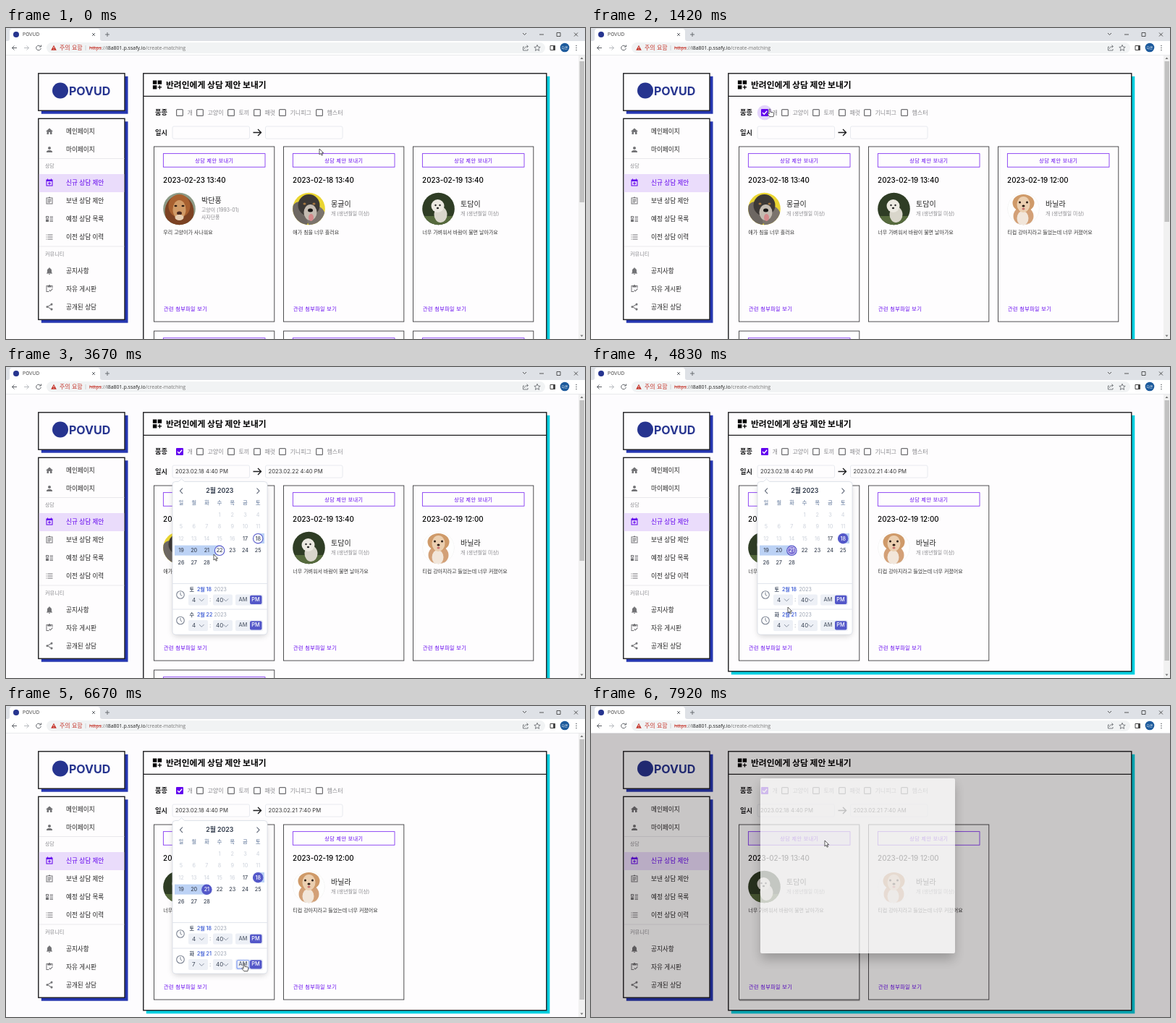
An HTML page that plays this animation: 800 by 430 pixels, repeating every 8 s.

```html
<!DOCTYPE html>
<html lang="ko">
<head>
<meta charset="utf-8">
<title>상담 제안</title>
<style>
html, body { margin: 0; width: 100%; height: 100%; overflow: hidden; background: #fdfcfe; }
svg { display: block; width: 800px; height: 430px; font-family: Inter, "Noto Sans CJK KR", "Noto Sans CJK", sans-serif; }
text { white-space: pre; }
</style>
</head>
<body>
<svg id="stage" viewBox="0 0 800 430">
  <defs>
    <clipPath id="disc"><circle r="22.3"/></clipPath>
    <filter id="soft" x="-20%" y="-20%" width="140%" height="140%"><feGaussianBlur stdDeviation="4"/></filter>
    <filter id="wide" x="-20%" y="-20%" width="140%" height="140%"><feGaussianBlur stdDeviation="8"/></filter>
  </defs>
  <g id="panel"/><g id="sidebar"/><g id="filters"/><g id="cards"/><g id="picker"/><g id="scrollbar"/>
  <g id="modal"/><g id="browser"/><g id="cursor"/>
</svg>
<script>
const LOOP = 8000;
const AT = { check: 1050, open: 2150, drag: 3420, drop: 4300, hour: 5500, am: 6700, close: 7150, modal: 7790 };
const PURPLE = '#6200ee', INDIGO = '#5458c9', INK = '#1c1c1e', GRAY = '#8a8a8e', PAPER = '#fefdfe';

// Drawing helpers
const text = (x, y, size, str, fill = INK, weight = 400, more = '') =>
  `<text x="${x}" y="${y}" font-size="${size}" fill="${fill}" font-weight="${weight}" ${more}>${str}</text>`;
const mid = 'text-anchor="middle"';
const rect = (x, y, w, h, fill, more = '') =>
  `<rect x="${x}" y="${y}" width="${w}" height="${h}" fill="${fill}" ${more}/>`;
const oval = (x, y, rx, ry, fill, more = '') =>
  `<ellipse cx="${x}" cy="${y}" rx="${rx}" ry="${ry}" fill="${fill}" ${more}/>`;
const line = (d, stroke, width = 1, more = '') =>
  `<path d="${d}" fill="none" stroke="${stroke}" stroke-width="${width}" ${more}/>`;
const icon = (x, y, scale, d, fill) =>
  `<path transform="translate(${x - 12 * scale} ${y - 12 * scale}) scale(${scale})" d="${d}" fill="${fill}" fill-rule="evenodd"/>`;
const ramp = (t, from, span) => Math.min(1, Math.max(0, (t - from) / span));

const shown = {};
function put(id, html) {
  if (shown[id] !== html) document.getElementById(id).innerHTML = shown[id] = html;
}

// Browser window
function browser() {
  const dark = '#5f6368';
  return rect(0, 0, 800, 18, '#dee1e6') + rect(0, 18, 800, 19.5, '#fff') +
    `<path d="M2 18q3 0 3-3V5q0-4 4-4H126q4 0 4 4V15q0 3 3 3z" fill="#fff"/>` +
    oval(14, 9, 4, 4, '#26348f') + text(23, 11.4, 6.6, 'POVUD', '#444') +
    line('M119 7l4 4m0-4l-4 4M137 9h6M140 6v6', dark, .9) +
    line('M714 7l2.5 2.5L719 7M737 9h6M761 6.5h5v5h-5zM785 6.5l5 5m0-5l-5 5', '#333', .8) +
    rect(56, 20, 689, 15, '#f1f3f4', 'rx="7.5"') +
    line('M15 27.5H8.5m3-3l-3 3 3 3', dark, 1) + line('M25 27.5h6.5m-3-3l3 3-3 3', '#b9bcc0', 1) +
    line('M47.5 25.3A3.3 3.3 0 1 0 48.3 28M48.5 23.5v2.5h-2.5', dark, 1) +
    `<path d="M66 23.8l3.8 7h-7.6z" fill="#c5352b"/>` + line('M66 26v2.3m0 .7v.8', '#fff', .8) +
    text(74, 30.4, 8, '주의 요함', '#c5352b') + line('M110 24v7', '#c9ccd0', .8) +
    `<text x="115" y="30" font-size="7" font-family="Open Sans, sans-serif" fill="#777"><tspan fill="#c5352b" text-decoration="line-through">https</tspan>://<tspan fill="#222">i8a801.p.ssafy.io</tspan>/create-matching</text>` +
    line('M716 26h-1.5v5h6.5v-2M716.5 29q0-3.5 4.5-3.5m-1.5-2l2 2-2 2', dark, .8) +
    line('M734 23.3l1.2 2.8 3 .3-2.3 2 .7 3-2.6-1.6-2.6 1.6.7-3-2.3-2 3-.3z', dark, .8) +
    line('M752 24.5h6.5v6h-6.5z', '#444', 1) + rect(756, 24.5, 2.5, 6, '#444') +
    oval(772, 27, 6.3, 6.3, '#1c5a9c') + text(772, 28.8, 4.9, '다온', '#fff', 400, mid) +
    [24.5, 27.5, 30.5].map(y => oval(788, y, .8, .8, dark)).join('') + rect(0, 37, 800, .6, '#dcdee2');
}

// Sidebar
const BOARD = 'M19 3h-4.2a3 3 0 0 0-5.6 0H3v18h18V3zM5 5h14v14H5z';
const MENU = [
  [143, '메인페이지', 'M10 20v-6h4v6h5v-8h3L12 3 2 12h3v8z'],
  [168, '마이페이지', 'M12 12a4 4 0 1 0 0-8 4 4 0 0 0 0 8zm0 2c-2.7 0-8 1.3-8 4v2h16v-2c0-2.7-5.3-4-8-4z'],
  [214, '신규 상담 제안', 'M19 3h-1V1h-2v2H8V1H6v2H3v18h18V3zM5 8h14v11H5zM11 9.5h2v3h3v2h-3v3h-2v-3H8v-2h3z'],
  [239, '보낸 상담 제안', BOARD + 'M7 8h10v2H7zM7 11.5h10v2H7zM7 15h7v2H7z'],
  [264, '예정 상담 목록', 'M2 4h8v7H2zM4 6h4v3H4zM2 13h8v7H2zM13 5h9v2h-9zM13 9h9v2h-9zM13 14h9v2h-9zM13 18h9v2h-9z'],
  [289, '이전 상담 이력', 'M3 5h2v2H3zM3 11h2v2H3zM3 17h2v2H3zM7 5h14v2H7zM7 11h14v2H7zM7 17h14v2H7z'],
  [336, '공지사항', 'M12 22a2 2 0 0 0 2-2h-4a2 2 0 0 0 2 2zm6-6v-5c0-3-1.6-5.6-4.5-6.3V4a1.5 1.5 0 0 0-3 0v.7C7.6 5.4 6 8 6 11v5l-2 2v1h16v-1z'],
  [360.5, '자유 게시판', 'M19 3h-4.2a3 3 0 0 0-5.6 0H3v18h8v-2H5V5h2v3h10V5h2v5h2V3zM20 11.5l1.5 1.5-7 7-4-4 1.5-1.5 2.5 2.5z'],
  [385.5, '공개된 상담', 'M18 2a3 3 0 0 0-3 3l.1.7L8 9.8a3 3 0 1 0 0 4.4l7.1 4.1a3 3 0 1 0 1-1.7L9 12.5v-1l7.1-4.1A3 3 0 1 0 18 2z'],
];
const framed = (x, y, w, h, shadow) => rect(x + 4, y + 4, w + .5, h + .5, shadow) +
  rect(x, y, w, h, PAPER, `stroke="${INK}" stroke-width="1.4"`);

function sidebar() {
  const blue = '#2536b0';
  return framed(44.8, 62.8, 119.2, 51.4, blue) + oval(75, 86.5, 11, 11, '#26348f') +
    text(87, 92.5, 16, 'POVUD', '#26348f', 700) +
    framed(44.8, 125.3, 119.2, 277.9, blue) + rect(45.8, 202, 117.5, 25, '#eadcfb') +
    line('M46 180.5h117.5M46 302h117.5', '#e4e4e8', .8) +
    text(54, 192.7, 6.9, '상담', GRAY) + text(54, 314.7, 7.2, '커뮤니티', GRAY) +
    MENU.map(([y, label, d]) => icon(60, y, .5, d, y == 214 ? PURPLE : '#737376') +
      text(83, y + 3.2, 8.6, label, y == 214 ? PURPLE : '#222')).join('');
}

// Main panel
function panel(short) {
  return framed(189.8, 62.8, 557, short ? 358 : 500, '#00cfe0') + line('M190 94.3h557', INK, 1.2) +
    icon(209, 78.5, .68, 'M3 3h8v8H3zM13 3h8v8h-8zM3 13h8v8H3zM16 13h2v3h3v2h-3v3h-2v-3h-3v-2h3z', '#000') +
    text(221, 82.8, 11.8, '반려인에게 상담 제안 보내기', '#000', 700);
}

const KINDS = [[240, '개'], [268, '고양이'], [311, '토끼'], [347, '패럿'], [382, '기니피그'], [433, '햄스터']];
function filters(checked, halo, from, to) {
  const boxes = KINDS.map(([x, label], i) => (checked && !i
    ? rect(x - 5, 112, 10, 10, PURPLE, 'rx="1"') + line('M237 117l2.2 2.2 4-4.4', '#fff', 1.4)
    : rect(x - 4.4, 112.6, 8.8, 8.8, 'none', 'rx="1" stroke="#6d6d70" stroke-width="1.2"')) +
    text(x + 10.5, 119.8, 8, label, GRAY)).join('');
  return text(206, 120.3, 9.2, '품종', INK, 700) + text(206, 147.8, 9.2, '일시', INK, 700) +
    oval(240, 117, 10.3, 10.3, '#dcc8fa', `opacity="${halo * .8}"`) + boxes +
    [230, 358.5].map(x => rect(x, 136, 106.5, 17, PAPER, 'rx="2" stroke="#e6e8ee" stroke-width=".9"')).join('') +
    line('M341.5 144.5h11m-4.5-4.5l4.5 4.5-4.5 4.5', INK, 1.4) +
    text(234, 147.3, 7.7, from, '#333') + text(362.5, 147.3, 7.7, to, '#333');
}

// Cards
const LION = {
  date: '2023-02-23 13:40', name: '박단풍', info: ['고양이 (1993-01)', '사자단풍'], note: '우리 고양이가 사나워요',
  photo: rect(-23, -23, 46, 46, '#8d9a86') + oval(0, 4, 20, 23, '#7c4223') + oval(0, -4, 15, 16, '#a8602f') +
    oval(0, 1, 9, 13, '#d09a66') + oval(-5, -4, 2, 1.3, '#2b1a12') + oval(5, -4, 2, 1.3, '#2b1a12') +
    oval(0, 6, 3.5, 2.5, '#4b2a20') + oval(0, 12, 6, 4, '#e6cdb0'),
};
const BLACK = {
  date: '2023-02-18 13:40', name: '몽글이', info: ['개 (생년월일 미상)'], note: '애가 침을 너무 흘러요',
  photo: rect(-23, -23, 46, 46, '#ead532') + oval(-13, 10, 13, 20, '#6d6762') + oval(10, 12, 13, 16, '#7b746d') +
    oval(0, -5, 15, 15, '#3d3936') + oval(2, 5, 9, 11, '#c4bbb1') + oval(2, 2, 3.5, 2.5, '#171514') +
    oval(3, 12, 3.5, 5, '#d58a8c') + oval(-6, -7, 2, 1.5, '#a57843') + oval(7, -7, 2, 1.5, '#a57843'),
};
const WHITE = {
  date: '2023-02-19 13:40', name: '토담이', info: ['개 (생년월일 미상)'], note: '너무 가벼워서 바람이 불면 날아가요',
  photo: rect(-23, -23, 46, 46, '#2f3d25') + rect(-23, 10, 46, 16, '#566a3d') + oval(3, 8, 9, 11, '#d9d6cb') +
    oval(-1, -4, 9, 9, '#ece9e1') + oval(-4, -5, 1.2, 1.2, '#222') + oval(2, -5, 1.2, 1.2, '#222') + oval(-1, -1, 1.6, 1.2, '#222'),
};
const TAN = {
  date: '2023-02-19 12:00', name: '바닐라', info: ['개 (생년월일 미상)'], note: '티컵 강아지라고 들었는데 너무 커졌어요',
  photo: rect(-23, -23, 46, 46, '#fefefe') + oval(0, 10, 14, 13, '#d3a077') + oval(-1, 13, 8, 10, '#f2e6da') +
    oval(0, -8, 15, 12, '#cf9a69') + oval(0, -6, 9, 11, '#ebcfb0') + oval(-5, -9, 1.5, 1.5, '#2a1c14') +
    oval(5, -9, 1.5, 1.5, '#2a1c14') + oval(0, -4, 2, 1.5, '#2a1c14') + oval(0, 0, 2, 1.5, '#c9706c') +
    '<circle r="22" fill="none" stroke="#eee" stroke-width=".7"/>',
};
const ALL = [LION, BLACK, WHITE, TAN, BLACK, WHITE], DOGS = [BLACK, WHITE, TAN, LION], IN_RANGE = [WHITE, TAN];

function card(pet, i, hover) {
  const x = 204.5 + i % 3 * 179, y = 164 + Math.floor(i / 3) * 255, extra = pet.info.length > 1;
  const lit = hover && !i;
  return `<g transform="translate(${x} ${y})">` +
    (lit ? rect(.5, 2, 166.5, 242, '#000', 'opacity=".25"') : '') +
    rect(0, 0, 166.3, 242, PAPER, 'stroke="#3c3c3e" stroke-width=".9"') +
    rect(12.8, 9.7, 140.7, 18.5, lit ? '#f1e8fd' : PAPER, `stroke="${PURPLE}" stroke-width=".7"`) +
    text(83.4, 21.6, 7, '상담 제안 보내기', PURPLE, 500, mid + ' letter-spacing=".5"') +
    text(12.6, 49.9, 9.8, pet.date, '#000', 500) +
    `<g transform="translate(35 86)" clip-path="url(#disc)">${pet.photo}</g>` +
    text(65.5, extra ? 78 : 83, 10, pet.name, '#222') +
    pet.info.map((s, n) => text(65.5, (extra ? 90 : 95) + n * 10.3, 6.9, s, GRAY)).join('') +
    text(12.8, 120.7, 7, pet.note, '#333') +
    text(13.5, 226.6, 7, '관련 첨부파일 보기', PURPLE, 500, 'letter-spacing=".5"') + '</g>';
}

// Date picker
const WEEK = [...'일월화수목금토'];
const cell = day => [242 + (day + 2) % 7 * 17.7, 204 + Math.floor((day + 2) / 7) * 16.6];

function timeRow(y, day, hour, am, focus) {
  const chosen = day > 16;
  const label = (x, str, on) => text(x, y + 24.2, 7.3, str, on ? '#fff' : '#5b6474', 500, mid);
  return line(`M230 ${y}h131`, '#dfe3ea', .9) + `<g opacity="${chosen ? 1 : .5}">` +
    `<circle cx="241" cy="${y + 15.5}" r="5.3" fill="none" stroke="#7d8594" stroke-width="1.1"/>` +
    line(`M241 ${y + 12}v3.5l2.3 1.5`, '#7d8594', 1) +
    text(253.5, y + 10.2, 7, WEEK[(day + 2) % 7], '#4a5568', 600) +
    text(264, y + 10.2, 7, `2월 ${day}`, '#4260d6', 600) + text(287.5, y + 10.2, 7, '2023', '#98a1b0') +
    rect(252, y + 15, 27, 15, '#edf0f6', 'rx="2"') + rect(286, y + 15, 27, 15, '#edf0f6', 'rx="2"') +
    rect(317, y + 15, 38, 15, '#edf0f6', 'rx="2"') +
    (chosen ? text(257, y + 25, 8, hour, '#3c4658') + text(290, y + 25, 8, '40', '#3c4658') : '') +
    line(`M267 ${y + 21}l3.3 3.3 3.3-3.3M300.5 ${y + 21}l3.3 3.3 3.3-3.3`, '#8b94a4', 1) +
    text(281, y + 24.5, 8, ':', '#8b94a4') +
    rect(am ? 319 : 337, y + 16.3, 16.5, 12.2, INDIGO, 'rx="2"') + label(327.5, 'AM', am) + label(345, 'PM', !am) +
    (focus ? rect(319, y + 16.5, 17, 11.7, 'none', 'rx="2" stroke="#7f9cf5" stroke-width="1.2"') : '') + '</g>';
}

function picker({ start, end, dragging, hover, ring, hour, am, focus }) {
  let bands = '', dots = '', days = '';
  if (start) {
    bands = rect(348, 230, 9, 14, '#bcd2f5');
    if (end > 18) bands += rect(233, 246.6, cell(end)[0] - 233, 14, '#bcd2f5');
  }
  if (hover) dots += oval(...cell(hover), 7, 7, '#e8ebf0');
  for (const day of start ? new Set([start, end]) : [])
    dots += oval(...cell(day), 6.7, 6.7, dragging ? '#fff' : INDIGO, `stroke="${INDIGO}" stroke-width="1.1"`);
  if (ring) dots += oval(...cell(end), 5.6, 5.6, '#7a70d4', `stroke="#e6d8f6" stroke-width="1" opacity="${ring}"`);
  for (let day = 1; day <= 28; day++) {
    const [x, y] = cell(day), solid = start && !dragging && (day == start || day == end);
    days += text(x, y + 2.6, 7.2, day, solid ? '#fff' : day < 17 ? '#d3d8e0' : '#3e4757', 500, mid);
  }
  return rect(231, 163, 129, 209, '#000', 'rx="5" opacity=".18" filter="url(#soft)"') +
    '<path d="M234 158.5h4.5l4-4 4 4H357q4 0 4 4V366q0 4-4 4H234q-4 0-4-4V162.5q0-4 4-4z" fill="#fff" stroke="#d8dde6" stroke-width=".8"/>' +
    line('M244 167.5l-3.5 3.8 3.5 3.8M346.5 167.5l3.5 3.8-3.5 3.8', '#5b6474', 1.1) +
    text(295.3, 174.3, 8.8, '2월 2023', '#2d3748', 600, mid) +
    WEEK.map((d, i) => text(242 + i * 17.7, 190, 7, d, '#8798b3', 600, mid)).join('') +
    bands + dots + days + timeRow(299.5, start || 16, 4, false, false) + timeRow(335, end || 16, hour, am, focus);
}

// Pointer: time, x, y of the hot spot
const ROUTE = [[0, 433, 167], [80, 433, 167], [850, 242, 114], [1420, 247, 112], [1700, 247, 112], [2050, 280, 144],
  [2200, 280, 144], [2700, 279, 255], [2800, 279, 255], [3300, 347, 236], [3430, 347, 236], [3660, 287, 259],
  [3800, 287, 259], [4170, 279, 256], [4400, 279, 256], [4830, 272, 332], [5200, 264, 355], [5850, 264, 355],
  [6500, 329, 356], [6850, 329, 356], [7500, 323, 186], [LOOP, 323, 186]];
function pointer(t) {
  const i = ROUTE.findIndex(p => p[0] > t), [t0, x0, y0] = ROUTE[i - 1], [t1, x1, y1] = ROUTE[i];
  const u = (t - t0) / (t1 - t0), e = u * u * (3 - 2 * u);
  return [x0 + (x1 - x0) * e, y0 + (y1 - y0) * e];
}
const ARROW = 'M0 0v8l1.9-1.7 1.3 2.9 1.3-.6-1.3-2.8h2.5z';
const HAND = 'M-.9.9q0-.9.9-.9t.9.9v3.3l4 .8q1 .3.9 1.4l-.8 4.2h-5.2l-3-4q.6-1 1.7-.2l.6.6z';
const isHand = t => (t > 820 && t < 1760) || (t > 2550 && t < 3430) || (t > 6350 && t < 6950);

const scrollbar = bottom => rect(791, 37.5, 9, 392.5, '#f1f1f1') + rect(792.5, 46, 6.5, bottom - 46, '#c1c1c1') +
  '<path d="M793.5 43l2-2.5 2 2.5zM793.5 424.5l2 2.5 2-2.5z" fill="#707070"/>';

function draw(t) {
  const [x, y] = pointer(t);
  const checked = t >= AT.check, picked = t >= AT.drag, dropped = t >= AT.drop;
  const dragging = picked && !dropped;
  const dayBelow = y < 245 ? 18 : 19 + Math.round((x - 242) / 17.7);
  const end = dropped ? 21 : picked ? dayBelow : 0;
  const hour = t >= AT.hour ? 7 : 4, am = t >= AT.am;
  const halo = ramp(t, 830, 150) * (1 - ramp(t, 1740, 150));
  const fade = ramp(t, AT.modal, 225);

  put('panel', panel(dropped));
  put('filters', filters(checked, halo, picked ? '2023.02.18 4:40 PM' : '',
    picked ? `2023.02.${end} ${hour}:40 ${am ? 'AM' : 'PM'}` : ''));
  put('cards', (dropped ? IN_RANGE : checked ? DOGS : ALL).map((pet, i) => card(pet, i, t > 7450)).join(''));
  put('scrollbar', fade ? '' : scrollbar(dropped ? 406 : checked ? 268 : 241));

  const open = ramp(t, AT.open, 150) * (1 - ramp(t, AT.close, 150));
  const hover = !picked && t > 2500 && y > 198 && x < 357 ? (y < 245 ? 17 + (x > 339) : 19 + Math.round((x - 242) / 17.7)) : 0;
  put('picker', open ? `<g opacity="${open}">` + picker({ start: picked ? 18 : 0, end, dragging, hover,
    ring: dropped ? 1 - ramp(t, 4900, 200) : 0, hour, am, focus: t > 6550 }) + '</g>' : '');

  put('modal', fade ? rect(0, 37, 800, 393, '#0c0004', `opacity="${fade * .38}"`) +
    `<g opacity="${Math.min(1, fade * 1.26)}">` +
    rect(235, 108, 267, 242, '#000', 'opacity=".32" filter="url(#wide)"') +
    rect(234, 100, 269, 242, '#fff', 'rx="2"') + '</g>' : '');
  put('cursor', `<path transform="translate(${x} ${y})" d="${isHand(t) ? HAND : ARROW}" fill="#fff" stroke="#333" stroke-width=".8"/>`);
}

put('browser', browser());
put('sidebar', sidebar());
let start;
function tick(now) {
  start ??= now;
  draw((now - start) % LOOP);
  requestAnimationFrame(tick);
}
requestAnimationFrame(tick);
</script>
</body>
</html>
```
